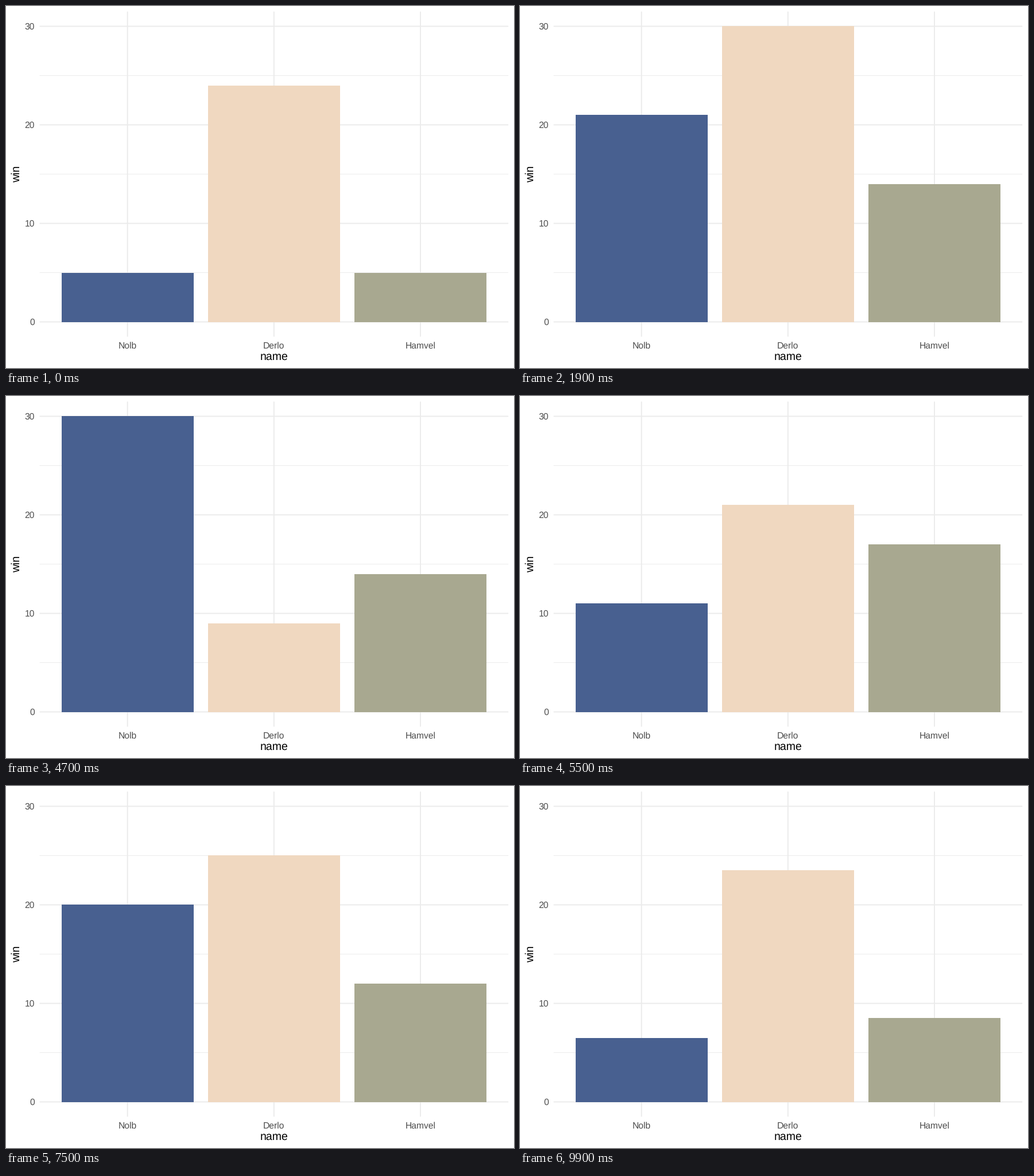
A matplotlib script that plays this animation: 885 by 632 pixels, repeating every 10000 ms.

```python
import numpy as np
import matplotlib.pyplot as plt
from matplotlib.animation import FuncAnimation
from matplotlib.patches import Rectangle

W, H, DPI = 885, 632, 100
FRAMES, INTERVAL = 100, 100

plt.rcParams["font.family"] = "Liberation Sans"
plt.rcParams["text.hinting"] = "none"

# Panel geometry in pixels, y pointing down
LEFT, RIGHT, TOP, BOTTOM = 58.5, 875.1, 9.7, 577.3
ZERO, UNIT = 551.53, 17.203
CENTERS = (211.65, 466.8, 721.95)
HALF = 114.9

NAMES = ("Nolb", "Derlo", "Hamvel")
COLORS = ("#486090", "#f0d8c0", "#a8a890")
GRID, TICK = "#ebebeb", "#4d4d4d"

WINS = np.array([
    (5, 24, 5), (16, 20, 10), (12, 27, 18), (19, 17, 9), (14, 22, 1),
    (21, 30, 14), (17, 12, 20), (10, 24, 4), (6, 23, 6), (18, 15, 11),
    (13, 20, 4), (22, 14, 19), (30, 9, 14), (20, 16, 1), (11, 21, 17),
    (18, 7, 24), (27, 12, 28), (15, 1, 18), (9, 18, 30), (20, 25, 12),
    (1, 16, 21), (14, 22, 13), (23, 28, 6), (17, 13, 30), (21, 8, 16),
    (2, 18, 20), (8, 23, 12),
])

# Every state is held for two frames; the early tweens are one frame longer
arrive = np.cumsum([-1] + [4] * 20 + [3] * 6)
knots = np.append(np.column_stack((arrive, arrive + 1)).ravel(), FRAMES)
levels = np.vstack((np.repeat(WINS, 2, axis=0), WINS[:1]))


def y_of(value):
    return ZERO - UNIT * value


def pt(px):
    return px * 72 / DPI


fig = plt.figure(figsize=(W / DPI, H / DPI), dpi=DPI, facecolor="white")
ax = fig.add_axes((0, 0, 1, 1))
ax.set_xlim(0, W)
ax.set_ylim(H, 0)
ax.axis("off")


def grid_line(xs, ys, width):
    ax.plot(xs, ys, color=GRID, lw=pt(width), solid_capstyle="butt",
            snap=False, zorder=1)


def label(x, y, text, size, color, **kw):
    ax.text(x, y, text, fontsize=pt(size), color=color, va="baseline", **kw)


for v in (5, 15, 25):
    grid_line((LEFT, RIGHT), (y_of(v),) * 2, 0.95)
for v in (0, 10, 20, 30):
    grid_line((LEFT, RIGHT), (y_of(v),) * 2, 1.9)
    label(49.8, y_of(v) + 5.6, str(v), 15.64, TICK, ha="right")
for x, name in zip(CENTERS, NAMES):
    grid_line((x, x), (TOP, BOTTOM), 1.9)
    label(x, 597.5, name, 15.64, TICK, ha="center")

label((LEFT + RIGHT) / 2, 618, "name", 19.56, "black", ha="center")
label(23.6, (TOP + BOTTOM) / 2, "win", 19.56, "black", ha="center",
      rotation=90, rotation_mode="anchor")

base = round(ZERO)
bars = []
for x, color in zip(CENTERS, COLORS):
    x0, x1 = round(x - HALF), round(x + HALF)
    bar = Rectangle((x0, base), x1 - x0, 0, facecolor=color, lw=0, zorder=2)
    bars.append(ax.add_patch(bar))


def update(frame):
    for i, bar in enumerate(bars):
        top = round(y_of(np.interp(frame, knots, levels[:, i])))
        bar.set_y(top)
        bar.set_height(base - top)
    return bars


anim = FuncAnimation(fig, update, frames=FRAMES, interval=INTERVAL,
                     repeat=True, repeat_delay=0, blit=False)
plt.show()
```
